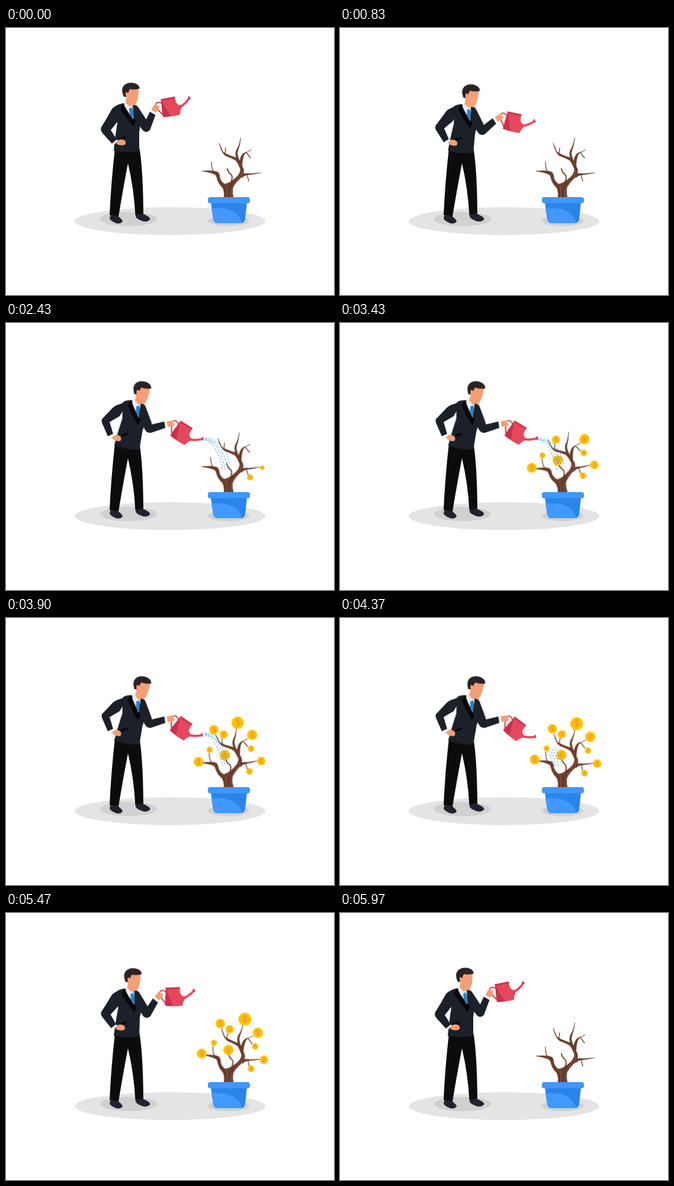
These frames come from a looping animation (554x450 px, 6.01 s). An HTML page without scripts:

```html
<!DOCTYPE html>
<html lang="en">
<head>
<meta charset="utf-8">
<title>Watering the money tree</title>
<style>
html, body { margin: 0; width: 100%; height: 100%; overflow: hidden; background: #fff; }
svg { display: block; width: 554px; height: 450px; }

.torso, .head, .arm, .fore, .can, .back-arm, .back-hand, .tree, .water, .reveal {
  animation: 6.01s cubic-bezier(.37, 0, .63, 1) infinite;
}
.torso { animation-name: lean; transform-origin: 204px 210px; }
.head { animation-name: nod; }
.arm { animation-name: arm; transform-origin: 220px 136px; }
.fore { animation-name: fore; transform-origin: 237px 170px; }
.can { animation-name: can; transform-origin: 254px 134px; }
.back-arm { animation-name: back-arm; }
.back-hand { animation-name: back-hand; transform-origin: 183px 191.5px; }
.tree { animation-name: sway; transform-origin: 376px 285px; }
.water { animation-name: drift; }
.reveal { animation-name: reveal; animation-timing-function: linear; }
.drops { animation: flow 6.01s linear infinite; }
.coin {
  animation: grow 6.01s ease-out var(--d) infinite both, vanish 6.01s ease-in infinite;
}

@keyframes lean {
  0%, 98%, 100% { transform: translateY(0) rotate(0deg); }
  26.6%, 72.7% { transform: translateY(3px) rotate(9.5deg); }
}
@keyframes nod {
  0%, 98%, 100% { transform: translateX(0); }
  26.6%, 72.7% { transform: translateX(2px); }
}
@keyframes arm {
  0%, 98%, 100% { transform: rotate(0deg); }
  26.6%, 72.7% { transform: rotate(3deg); }
}
@keyframes fore {
  0%, 98%, 100% { transform: rotate(0deg); }
  26.6%, 72.7% { transform: rotate(38.5deg); }
}
@keyframes can {
  0%, 98%, 100% { transform: rotate(0deg); }
  26.6%, 40% { transform: rotate(-9deg); }
  57% { transform: rotate(-10deg); }
  72.7% { transform: rotate(-3.5deg); }
}
@keyframes back-arm {
  0%, 98%, 100% { d: path("M194 129 Q182 131 178 138 Q170 153 161 167 Q159 171 162 176 L179 195 L187 188 L177 172 L189 157 Z"); }
  26.6%, 72.7% { d: path("M206 133 Q186 137 180 143 Q170 154 162 162 Q161 165 162 168 L172 191 L181 187 L175 167 L192 157 Z"); }
}
@keyframes back-hand {
  0%, 98%, 100% { transform: translate(0, 0) rotate(0deg); }
  26.6%, 72.7% { transform: translate(-6.5px, -2.5px) rotate(17deg); }
}
@keyframes sway {
  0%, 32.4%, 99%, 100% { transform: rotate(0deg); }
  57.4% { transform: rotate(-5.9deg); }
  84% { transform: rotate(4.3deg); }
}
@keyframes grow {
  0% { scale: 0; }
  6%, 62% { scale: 1; }
  62.1%, 100% { scale: 0; }
}
@keyframes vanish {
  0%, 34% { transform: scale(0); }
  35%, 95.2% { transform: scale(1); }
  99%, 100% { transform: scale(0); }
}
@keyframes drift {
  0%, 68%, 100% { transform: translate(0, 0); }
  73%, 78% { transform: translate(-5px, 5px); }
}
@keyframes reveal {
  0%, 20.6% { stroke-dashoffset: 1; }
  31.6%, 69% { stroke-dashoffset: 0; }
  76.5%, 100% { stroke-dashoffset: -1; }
}
@keyframes flow { to { stroke-dashoffset: -605; } }
</style>
</head>
<body>
<svg viewBox="0 0 554 450">
  <defs>
    <g id="coin">
      <circle r="10" fill="#ffc60d"/>
      <circle r="7.6" fill="#fdbb12"/>
      <text y="4.7" text-anchor="middle" font-family="Lato, Arial, sans-serif" font-size="13.5" fill="#e98f1c">$</text>
    </g>
    <mask id="stream" maskUnits="userSpaceOnUse" x="320" y="180" width="80" height="90">
      <path class="reveal" d="M332 195 Q363 197 374 252" pathLength="1" stroke-dasharray="1 2" stroke-dashoffset="1" fill="none" stroke="#fff" stroke-width="26"/>
    </mask>
  </defs>

  <ellipse cx="277" cy="325.5" rx="161" ry="23.5" fill="#e4e4e4"/>
  <g fill="#d0d0d0">
    <ellipse cx="207" cy="322" rx="48" ry="12"/>
    <ellipse cx="376" cy="325" rx="35" ry="9"/>
  </g>

  <!-- tree -->
  <g class="tree">
    <g fill="#6b3f2e" stroke="#6b3f2e" stroke-width=".6" stroke-linejoin="round">
      <path d="M368 286 Q370 272 363 266 Q357 260 355 247 L357 244 L359.5 246 Q361 258 369 263 Q377 262 385 255 Q396 247 396 238 Q393 230 388 222 L391 220 Q396 229 401 237 Q403 244 398 251 Q386 262 383 270 Q382 278 384 286Z"/>
      <path d="M331 241 Q352 239.500 358 243 Q362 247 361 258 L355.500 250 Q355 245 331 241Z"/>
      <path d="M360 194 L366 208 Q371 213 390 219 L396 230 Q388 221 371 215.500 Q364 211 360 194Z"/>
      <path d="M396.500 185 Q395 199 391.500 207 Q389 213 396 227 L391 225 Q386 213 389 206 Q394 199 396.500 185Z"/>
      <path d="M414.500 205.500 Q405 209 402 214 Q398 224 399 238 L394 228 Q396 214 402 210.500 Q408 209 414.500 205.500Z"/>
      <path d="M430 244 Q415 247 409 247.500 Q402 248 398 253 L399 246 Q404 244.500 412 245.500Z"/>
    </g>
    <g fill="none" stroke="#6b3f2e" stroke-width="1.3" stroke-linecap="round">
      <path d="M379 262 Q385 250 379 246 Q375 243 374 237" stroke-width="1.8"/>
      <path d="M352 243 Q347 240 347 226 M370 212 L371 202 M406 210 L413 219 M407 247 L410 258"/>
    </g>
    <g fill="none" stroke-width=".8">
      <path stroke="#93614a" d="M373 285 Q374 272 371 265 M380 285 Q378 270 390 256 Q399 247 398 238"/>
      <path stroke="#4d2b1f" d="M376 285 Q376 268 386 257 M370 285 Q373 272 367 266"/>
    </g>
    <g transform="translate(413 261) scale(.56)"><use href="#coin" class="coin" style="--d:2.15s"/></g>
    <g transform="translate(434 245) scale(.72)"><use href="#coin" class="coin" style="--d:2.3s"/></g>
    <g transform="translate(418.5 223) scale(.54)"><use href="#coin" class="coin" style="--d:2.45s"/></g>
    <g transform="translate(422 200) scale(.88)"><use href="#coin" class="coin" style="--d:2.6s"/></g>
    <g transform="translate(373.5 231) scale(.88)"><use href="#coin" class="coin" style="--d:2.75s"/></g>
    <g transform="translate(348.5 220) scale(.51)"><use href="#coin" class="coin" style="--d:2.85s"/></g>
    <g transform="translate(328.5 239) scale(.84)"><use href="#coin" class="coin" style="--d:2.95s"/></g>
    <g transform="translate(374 196) scale(.7)"><use href="#coin" class="coin" style="--d:3.05s"/></g>
    <g transform="translate(358 187) scale(.8)"><use href="#coin" class="coin" style="--d:3.45s"/></g>
    <g transform="translate(399 178) scale(1.1)"><use href="#coin" class="coin" style="--d:3.6s"/></g>
  </g>

  <!-- pot -->
  <path fill="#2b84ea" d="M346 294 H407 L404 322 Q403 329 396 329 H358 Q351 329 350 322Z"/>
  <path fill="#4398ff" d="M347 304 Q390 300 399 328.500 L396 329 H358 Q351 329 350 322Z"/>
  <rect x="341" y="285" width="71" height="10.5" rx="4" fill="#4097ff"/>

  <!-- water -->
  <g class="water">
    <g mask="url(#stream)">
      <g class="drops" fill="none" stroke="#3b97dc" stroke-width="1" stroke-dasharray="3 2.5">
        <path d="M334 193.5 Q368 196 378 238"/>
        <path d="M333 195 Q365 199 375 246"/>
        <path d="M335 196 Q361 199 370 247"/>
        <path d="M334 197 Q357 202 366 249"/>
      </g>
    </g>
  </g>

  <!-- legs -->
  <path fill="#0c0c0d" d="M184 203 H225.500 Q231.500 240 232 313 L218.500 316 Q216 270 206 228 Q197 275 190 318 L175 315 Q177.500 260 184 203Z"/>
  <g fill="#20232e">
    <path d="M176.500 315 L189 317 Q196 322 197 326 Q193 331 186 329 Q176 325 175 321Z"/>
    <path d="M219.500 314 L231 313 Q243 318 243.500 322 Q241 327 232 326 Q220 322 219 318Z"/>
  </g>

  <!-- upper body -->
  <g class="torso">
    <path fill="#1c2029" d="M197 127 Q186 129 184 134 L188 160 Q184 185 182 207 Q204 211 225 207 L225 175 Q230 150 222 132 Q219 129 216 130Z"/>
    <path fill="#060708" d="M197 127 L193 136 L203 151 L216 167 L221 150 Q221 139 215 132Z"/>
    <path fill="#e6edf8" d="M201 124 Q197 128 204 138 L215 154 Q218 140 215 129Z"/>
    <path fill="#2a80c6" d="M208 136 L212.5 133.5 L217 146 L215 153 L209 145Z"/>
    <path fill="#060708" d="M190 187 L202 182 L203 185 L192 190Z"/>
    <g class="head">
      <path fill="#f59f76" d="M206 102 L224 102 Q224 122 218.5 130 Q214 133 211 130 L210 133 L202 126 L203 117 Q199 112 203 107 Q205 107 206 110Z"/>
      <path fill="#2a2325" d="M199 116 Q193 104 199 97 Q205 91 215 92.5 Q225 94 226 102 Q217 105 209 103 Q207 108 206 110 Q203 106 202 110 Q202 113 203 116Z"/>
    </g>
  </g>

  <path class="back-arm" fill="#1c2029" d="M194 129 Q182 131 178 138 Q170 153 161 167 Q159 171 162 176 L179 195 L187 188 L177 172 L189 157 Z"/>
  <g class="back-hand">
    <path fill="#f59f76" d="M186 195 L190 189 Q196 186 201 190 Q204 195 200 197 Q192 199 186 195Z"/>
    <path fill="#f2f5fa" d="M179 195 L187 188 L189.5 190 L182 197Z"/>
  </g>

  <g class="torso">
    <g class="arm">
      <path fill="#1c2029" d="M214 130 Q222 130 225 136 L238 156 Q245 168 241 173 Q235 177 230 171 L216 152Z"/>
      <g class="fore">
        <path fill="#1c2029" d="M231 166 L243 141 L252.5 146.500 L243.5 171 Q238 178 232 173 Q229 170 231 166Z"/>
        <path fill="#f2f5fa" d="M243 141 L245 138 L254 143 L252.500 146.500Z"/>
        <g class="can">
          <path fill="none" stroke="#d63b53" stroke-width="2" d="M264 127 Q256 123 253 128 Q251 133 265 146"/>
          <path fill="#e5485c" d="M262 121 L285 116.5 L287 125 Q290 131 296 129.500 Q304 124 308.500 116 L311.500 118.500 Q304 129.500 296.500 134 Q294 139 294 146 Q280 150 265 150 Q263 136 262 121Z"/>
          <path fill="#c4334d" d="M262 121 Q271 137 278 148.5 Q272 150 265 150 Q263 136 262 121Z M261 120 L285 115.5 L286 118 L262 123Z M308 114.5 L312.500 118.500 L311 120 L307 116.500Z"/>
        </g>
        <path fill="#f59f76" d="M245.500 138 Q249 130 253 127 Q254 129 253 131 L257 130 Q260 132 258 136 L253.500 142.500Z"/>
      </g>
    </g>
  </g>
</svg>
</body>
</html>
```
